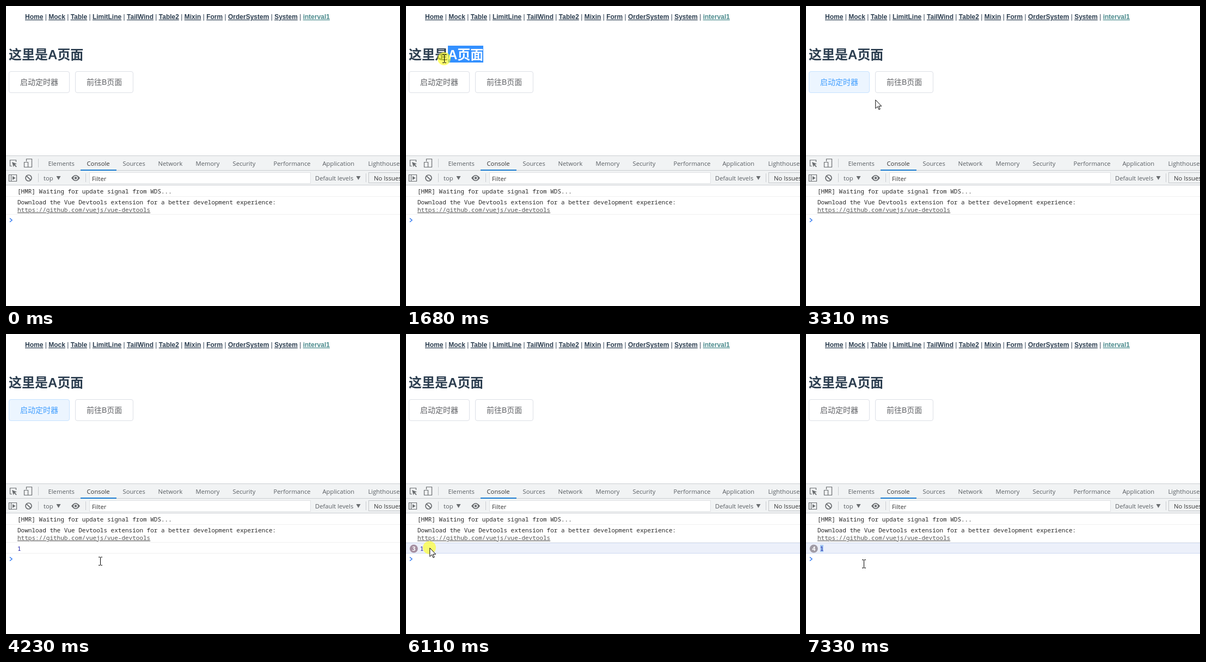
Recreate the animation shown at these times as an HTML page. Size 724 by 552 pixels, loop 8000 ms.

```html
<!DOCTYPE html>
<html lang="zh">
<head>
<meta charset="utf-8">
<title>Interval demo</title>
<style>
html, body { margin: 0; width: 100%; height: 100%; overflow: hidden; background: #fff; }
svg { display: block; width: 724px; height: 552px; }
text { white-space: pre; }
.nav, .title, .btn { font-family: "Liberation Sans", "Noto Sans CJK SC", "Noto Sans CJK", sans-serif; fill: #2c3e50; }
.nav { font-size: 12px; }
.nav .a { font-weight: bold; text-decoration: underline; }
.nav .on { fill: #4a8a8c; }
.title { font-size: 24px; font-weight: bold; }
.btn { font-size: 14px; }
.btn rect { fill: #fff; stroke: #dcdfe6; }
.btn text { fill: #606266; }
.btn.hot rect { fill: #ecf5ff; stroke: #c6e2ff; }
.btn.hot text { fill: #409eff; }
.ui { font: 11.25px "Open Sans", "Noto Sans", sans-serif; fill: #5a5f64; }
.dark { fill: #333; }
.log { font: 11px "Noto Sans Mono", "DejaVu Sans Mono", monospace; fill: #2a2a2a; }
.link { fill: #545454; text-decoration: underline; }
.num { fill: #1a1aa6; }
.badge text { font: bold 11px "Open Sans", sans-serif; fill: #fff; text-anchor: middle; }
.icon { fill: none; stroke: #6a6d70; stroke-width: 1.2; }
.solid { fill: #6a6d70; stroke: none; }
.sep { stroke: #cacdd1; }
.crisp { shape-rendering: crispEdges; }
</style>
</head>
<body>
<svg viewBox="0 0 724 552">
  <defs><clipPath id="clip"><rect id="clipBox" y="73" height="31"/></clipPath></defs>

  <text class="nav" id="nav" x="35" y="24"></text>
  <text class="title" x="5" y="98">这里是A页面</text>
  <rect id="selBox" class="crisp" y="73" height="31" fill="#3390ff"/>
  <text class="title" x="5" y="98" clip-path="url(#clip)" style="fill:#fff">这里是A页面</text>

  <g class="btn" id="startBtn"><rect x="5.5" y="120.5" width="111" height="39" rx="3.5"/><text x="26" y="145">启动定时器</text></g>
  <g class="btn" id="goBtn"><rect x="127.5" y="120.5" width="106" height="39" rx="3.5"/><text x="148" y="145">前往B页面</text></g>

  <g class="crisp">
    <rect y="275" width="724" height="55" fill="#f1f3f4"/>
    <path class="sep" d="M0 275.5H724M0 302.5H724M0 329.5H724M59.5 281V297M59.5 308V324M146.5 308V324M661.5 308V324"/>
    <rect x="137" y="301" width="66" height="2" fill="#1a7bd0"/>
    <rect x="153.5" y="306.5" width="406" height="20" fill="#fff" stroke="#e0e2e4"/>
    <rect x="666.5" y="306.5" width="70" height="19" fill="#f1f3f4" stroke="#c4c7ca"/>
  </g>
  <g class="icon">
    <path d="M11 294.5H7.5V283.5H18.5V287"/>
    <path class="solid" d="M11 287L20 290.5 16.3 291.8 19.8 295.3 18.5 296.5 15 293 13.7 296.5Z"/>
    <path d="M37.5 286V281.5H47.5V296.5H41M33.5 287.5H40.5V296.5H33.5Z"/>
    <path d="M5.5 310.5H19.5V322.5H5.5ZM9.5 310.5V322.5"/>
    <path class="solid" d="M12 313L17.5 316.5 12 320Z"/>
    <g stroke-width="1.7"><circle cx="41.5" cy="316.5" r="5.5"/><path d="M37.6 312.6L45.4 320.4"/></g>
    <path class="solid" fill-rule="evenodd" d="M120 316.5Q128 305.5 136 316.5Q128 327.5 120 316.5ZM128 312.5a4 4 0 1 0 .01 0Z"/>
    <circle class="solid" cx="128" cy="316.5" r="2.3"/>
    <path class="solid" d="M92.5 313H100.5L96.5 320ZM643.5 313H651.5L647.5 320Z"/>
  </g>
  <g class="ui">
    <text x="77.5" y="294">Elements</text>
    <text x="148.5" y="294" class="dark">Console</text>
    <text x="214.5" y="294">Sources</text>
    <text x="279.5" y="294">Network</text>
    <text x="348.5" y="294">Memory</text>
    <text x="416.5" y="294">Security</text>
    <text x="491.5" y="294">Performance</text>
    <text x="581.5" y="294">Application</text>
    <text x="665.5" y="294">Lighthouse</text>
    <text x="69" y="321">top</text>
    <text x="158" y="322" class="dark">Filter</text>
    <text x="568" y="321">Default levels</text>
    <text x="676" y="321" class="dark">No Issues</text>
  </g>

  <g class="log">
    <text x="21" y="345">[HMR] Waiting for update signal from WDS...</text>
    <text x="21" y="365">Download the Vue Devtools extension for a better development experience:</text>
    <text x="21" y="379" class="link">https://github.com/vuejs/vue-devtools</text>
  </g>
  <path class="crisp" d="M0 350.5H724M0 383.5H724" stroke="#f0f0f0"/>
  <g id="row">
    <path class="crisp" d="M0 403.5H724" stroke="#f0f0f0"/>
    <g id="rowHot" class="crisp">
      <rect y="384" width="724" height="20" fill="#ecf0fa"/>
      <path d="M0 384.5H724M0 403.5H724" stroke="#cedaf1"/>
    </g>
    <rect id="numSel" class="crisp" x="26" y="388" width="6" height="13" fill="#a3c8f2"/>
    <g class="badge" id="badge"><circle cx="14.3" cy="395" r="7.5"/><text x="14.3" y="399" id="count"></text></g>
    <text class="log num" id="num" y="399">1</text>
  </g>
  <path id="prompt" d="M7 390.5L11 394 7 397.5" fill="none" stroke="#367cf1" stroke-width="1.6"/>

  <g id="mouse">
    <circle id="press" r="12" fill="#ffff20" fill-opacity=".64"/>
    <path id="arrow" d="M.8 .8V16.5L4.5 13 7 18.6 9.200 17.600 6.700 12.200H11.700Z" fill="#fff" stroke="#000"/>
    <path id="hand" d="M-1.5 8V1.5Q0 -1 1.5 1.5V6.5Q3 5.5 4.5 7Q6 6 7.5 7.5Q9 6.5 10.5 8.5V13Q10 16 8.5 18.5H0Q-1 16 -4.5 12Q-5.5 9.5 -3.5 9.5L-1.5 11.5Z" fill="#fff" stroke="#000"/>
    <path id="beam" class="crisp" d="M-3 -7.5H0M1 -7.5H4M-3 7.5H0M1 7.5H4M.5 -7V7" fill="none" stroke="#000"/>
  </g>
</svg>
<script>
const $ = id => document.getElementById(id);
const LOOP = 8000, TICK = 77;
const TITLE_END = 142.3, GLYPH = 24;
const START_CLICK = 3000, ROW_CLICK = 5950;

$('nav').innerHTML = 'Home Mock Table LimitLine TailWind Table2 Mixin Form OrderSystem System interval1'.split(' ')
  .map(s => `<tspan class="a${s === 'interval1' ? ' on' : ''}">${s}</tspan>`).join('<tspan> | </tspan>');

// Mouse strokes: begin, end, x, y; it rests in between
const origin = [599, 531];
const strokes = [
  [200, 1040, 163, 100],
  [1220, 1680, 65, 97],
  [1760, 2230, 309, 229],
  [2500, 2830, 95, 147],
  [3150, 3310, 127, 172],
  [3310, 3540, 419, 300],
  [3540, 3760, 240, 394],
  [3760, 4100, 180, 420],
  [4100, 4460, 79, 395],
  [4550, 4770, 51, 402],
  [5300, 5460, 50, 394],
  [5900, 6080, 43, 393],
  [6110, 6500, 12, 392],
  [6780, 7300, 106, 423]
];
const presses = [[1220, 1760], [2440, 2500], [START_CLICK, 3150], [ROW_CLICK, 6780]];

const show = (id, on) => $(id).setAttribute('visibility', on ? 'inherit' : 'hidden');
const set = (id, name, v) => $(id).setAttribute(name, v);
const clamp = u => Math.max(0, Math.min(1, u));
const ease = u => u * u * (3 - 2 * u);

function mouseAt(t) {
  let [x, y] = origin;
  for (const [a, b, toX, toY] of strokes) {
    const e = ease(clamp((t - a) / (b - a)));
    x += (toX - x) * e;
    y += (toY - y) * e;
  }
  return [Math.round(x), Math.round(y)];
}

// Drag selection snaps to whole glyphs, counted from the title's end
function selectedWidth(t) {
  if (t < 1220 || t >= 2440) return 0;
  const [x] = mouseAt(Math.min(t, 1760));
  const n = Math.max(0, Math.round((TITLE_END - x) / GLYPH));
  return n < 3 ? n * GLYPH : n * GLYPH - 6.7;
}

function draw(t) {
  const [x, y] = mouseAt(t);
  const inside = (l, top, r, b) => x >= l && x < r && y >= top && y < b;
  const down = presses.some(([a, b]) => t >= a && t < b);
  const n = Math.max(0, Math.floor((t - START_CLICK - 50) / 1010));

  const width = selectedWidth(t);
  for (const id of ['selBox', 'clipBox']) {
    set(id, 'x', TITLE_END - width);
    set(id, 'width', width);
  }

  const overStart = inside(5, 120, 117, 160), overGo = inside(127, 120, 234, 160);
  $('startBtn').classList.toggle('hot', overStart || t >= START_CLICK && t < ROW_CLICK);
  $('goBtn').classList.toggle('hot', overGo);

  const numSel = t > ROW_CLICK && (x < 29 || t > 6500);
  show('row', n > 0);
  show('rowHot', t >= ROW_CLICK);
  show('numSel', numSel);
  show('badge', n > 1);
  set('badge', 'fill', n > 3 ? '#a09ba5' : '#a58fa1');
  $('count').textContent = n;
  set('num', 'x', n > 1 ? 25.7 : 21);
  set('prompt', 'transform', `translate(0 ${n ? 20 : 0})`);

  const hand = overStart || overGo;
  const beam = !hand && (
    down && (width > 0 || numSel) || inside(5, 73, 142, 104) || inside(153, 306, 560, 327) ||
    n > 0 && inside(25, 386, 32, 402) || inside(16, n ? 404 : 384, 724, 440));
  show('mouse', t >= 200);
  show('press', down);
  show('hand', hand);
  show('beam', beam);
  show('arrow', !hand && !beam);
  set('mouse', 'transform', `translate(${x} ${y})`);
}

const start = performance.now();
function frame() {
  const t = (performance.now() - start) % LOOP;
  draw(Math.floor((t + 1) / TICK) * TICK);
  requestAnimationFrame(frame);
}
frame();
</script>
</body>
</html>
```
